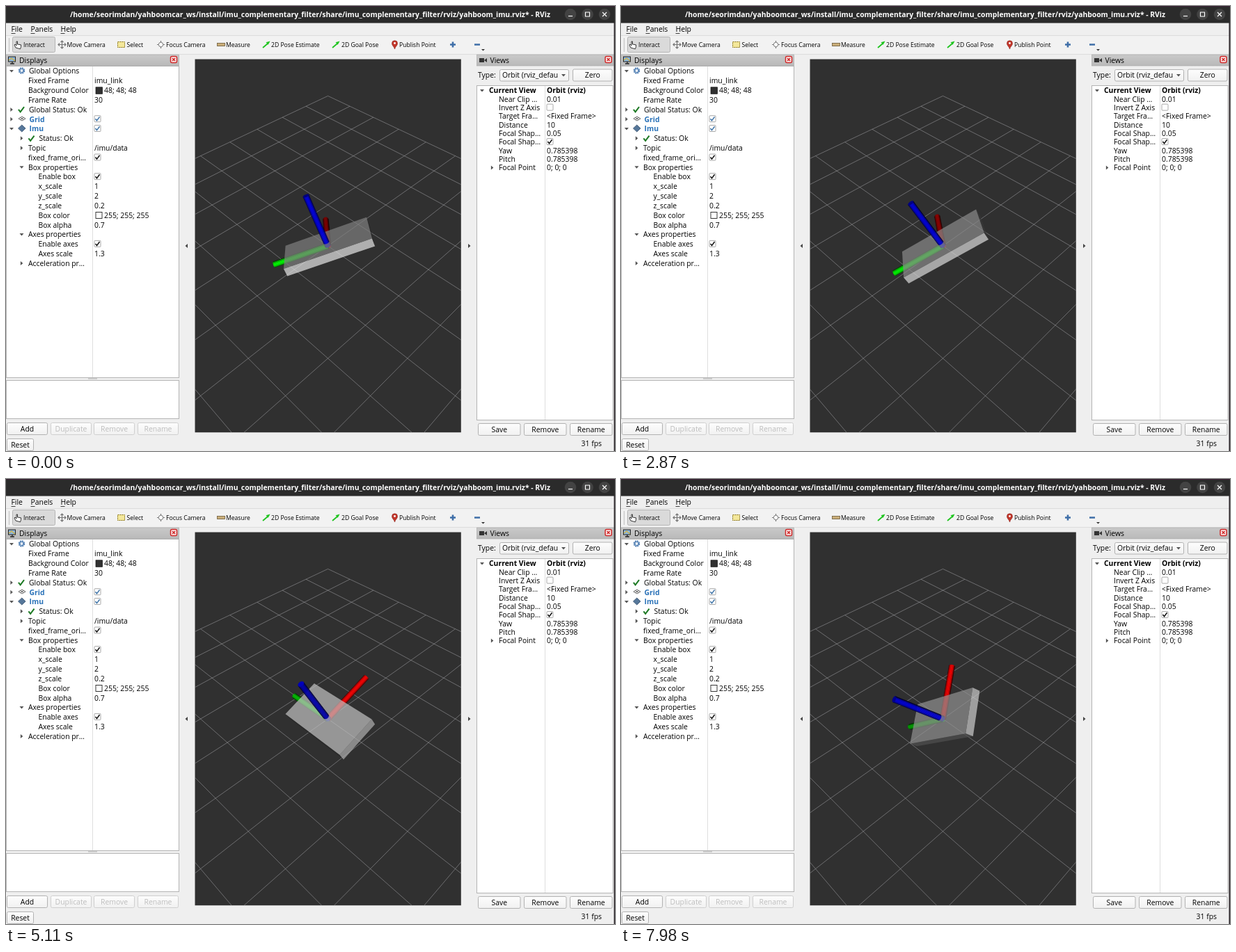
An HTML page for the animation above (8 s loop, 875 by 640 pixels).

```html
<!DOCTYPE html>
<html lang="en">
<head>
<meta charset="utf-8">
<title>Display panel</title>
<style>
html, body { margin: 0; width: 100%; height: 100%; overflow: hidden; background: #efefef; }
svg { display: block; font: 500 10.4px "Open Sans", "Noto Sans", sans-serif; }
text { white-space: pre; }
</style>
</head>
<body>
<svg id="stage" width="875" height="640" viewBox="0 0 875 640">
  <defs>
    <clipPath id="view"><rect x="271.5" y="76.5" width="382.3" height="536.8"/></clipPath>
    <clipPath id="combo"><rect x="711" y="92" width="82.5" height="16"/></clipPath>
    <linearGradient id="btn" x2="0" y2="1"><stop stop-color="#fdfdfd"/><stop offset="1" stop-color="#f1f1f1"/></linearGradient>
    <linearGradient id="head" x2="0" y2="1"><stop stop-color="#c9c9c9"/><stop offset="1" stop-color="#b9b9b9"/></linearGradient>
  </defs>
  <g id="ui"></g>
  <g clip-path="url(#view)">
    <rect x="271" y="76" width="384" height="538" fill="#303030"/>
    <path id="grid" fill="none" stroke="#a0a0a4" stroke-opacity=".6" stroke-width=".9"/>
    <g id="imu" stroke-linejoin="round"></g>
  </g>
  <text id="fps" x="856" y="632.5" text-anchor="end"></text>
</svg>
<script>
const $ = id => document.getElementById(id);
let ui = '';

// ---------- interface ----------
const rect = (x, y, w, h, fill, more = '') => ui += `<rect x="${x}" y="${y}" width="${w}" height="${h}" fill="${fill}" ${more}/>`;
const path = (d, fill, stroke = 'none', w = 1) => ui += `<path d="${d}" fill="${fill}" stroke="${stroke}" stroke-width="${w}"/>`;
const text = (x, y, s, more = '') =>
  ui += `<text x="${x}" y="${y + 3.8}" ${more}>${s.replace(/</g, '&lt;')}</text>`;
const circle = (x, y, r, fill, more = '') => ui += `<circle cx="${x}" cy="${y}" r="${r}" fill="${fill}" ${more}/>`;

function button(x, y, w, label, off) {
  rect(x + .5, y + .5, w - 1, 17, 'url(#btn)', `rx="2" stroke="${off ? '#cfcfcf' : '#b2b2b2'}"`);
  text(x + w / 2, y + 9, label, `text-anchor="middle" fill="${off ? '#bdbdbd' : '#000'}"`);
}
function tri(x, y, open) {
  path(open ? `M${x - 3} ${y - 1.5}h6l-3 3.4z` : `M${x - 1.6} ${y - 3}v6l3.4-3z`, '#555');
}
function tick(x, y, c, s = 1) {
  path(`M${x - 3 * s} ${y}l${2 * s} ${2.6 * s}l${4 * s} ${-5.4 * s}`, 'none', c, 1.5 * s);
}
function checkbox(x, y, on, c = '#111') {
  rect(x - 4.5, y - 4.5, 9, 9, '#fff', 'rx="1" stroke="#a9a9a9"');
  if (on) tick(x, y, c);
}
function header(x, w, label) {
  rect(x, 70, w, 16, 'url(#head)', 'stroke="#a5a5a5" stroke-width=".6"');
  const cx = x + w - 7.5;
  rect(cx - 4.5, 72.5, 9, 9, '#fbeeee', 'rx="2" stroke="#d02a2a" stroke-width="1.5"');
  path(`M${cx - 2} 75l4 4m0-4l-4 4`, 'none', '#d02a2a', 1.6);
  text(x + 19, 78, label);
}

// window frame and menus
rect(0, 0, 875, 24.5, '#2b2b2b');
rect(0, 0, 875, 1, '#3a2034');
text(437, 12, '/home/seorimdan/yahboomcar_ws/install/imu_complementary_filter/share/imu_complementary_filter/rviz/yahboom_imu.rviz* - RViz',
  'text-anchor="middle" fill="#fff" font-weight="700" font-size="10.37"');
[811, 835.5, 860].forEach(x => circle(x, 12, 8.3, '#434343'));
path('M808 14.5h6', 'none', '#fff', 1.2);
path('M832.5 9h6v6h-6z', 'none', '#fff', 1.2);
path('M857 9l6 6m0-6l-6 6', 'none', '#fff', 1.2);
['File', 'Panels', 'Help'].forEach((s, i) => {
  const x = [7.5, 35.5, 78.5][i];
  text(x, 33.5, s);
  path(`M${x} 39.5h6`, 'none', '#111', .8);
});

// toolbar
rect(0, 42, 875, 27, '#f2f2f2');
path('M0 42.5h875M0 69.5h875', 'none', '#dcdcdc');
path('M4.5 46v20', 'none', '#c4c4c4', 1.2);
rect(9.5, 44.5, 61, 22, '#dadada', 'rx="2" stroke="#b4b4b4"');
[[25, 'Interact'], [87.5, 'Move Camera'], [173.5, 'Select'], [230, 'Focus Camera'], [316, 'Measure'],
 [381, '2D Pose Estimate'], [482, '2D Goal Pose'], [565, 'Publish Point']]
  .forEach(([x, s]) => text(x, 55, s, 'font-size="8.6"'));
path('M14 60l-2-4 1-1 2 2v-6h1.5v4l5 .8v3l-1 3z', '#fff', '#222', .9);
path('M75 55.5h11M80.5 50v11M77 53.5l-2 2 2 2M84 53.5l2 2-2 2M78.5 52l2-2 2 2M78.5 59l2 2 2-2', 'none', '#777', 1.2);
rect(160.5, 51.5, 10, 8, '#f3e79a', 'stroke="#8a7416" stroke-dasharray="2 1"');
path('M217 55.5h11M222.5 50v11', 'none', '#777', 1.2);
circle(222.5, 55.5, 3.2, '#fff', 'stroke="#777"');
rect(303.5, 53.5, 11, 4, '#c9ad78', 'stroke="#6d5b3a" stroke-width=".8"');
[369, 469].forEach(x => {
  path(`M${x} 60l7-6`, 'none', '#1fc41f', 1.8);
  path(`M${x + 10.5} 50.5l-6 1.8 3.2 3.4z`, '#1fc41f');
});
path('M558.5 62c-1-4-4-5-4-8.3a4 4 0 0 1 8 0c0 3.3-3 4.3-4 8.3z', '#c2362b', '#8b241c', .6);
circle(558.5, 53.5, 1.4, '#fff');
path('M638 55.5h8M642 51.5v8M673 55.5h8', 'none', '#3f6fa8', 2.6);
path('M683 62h5l-2.5 2.6z', '#333');

// displays panel
header(0, 248.5, 'Displays');
rect(3.5, 73, 10, 7, '#8fb8dc', 'stroke="#222"');
path('M6 83h6M9 80v3', 'none', '#222', 1.3);
path('M4 78l4-3 5 4', 'none', '#d8b23a', 1.2);
rect(.5, 86.5, 248, 448, '#fff', 'stroke="#b4b4b4"');
path('M124.5 87v447', 'none', '#dedede');
const row = i => 93.6 + 13.82 * i;
[[33, 'Global Options'], [32, 'Fixed Frame', 'imu_link'], [32, 'Background Color', '48; 48; 48', 141],
 [32, 'Frame Rate', '30'], [33, 'Global Status: Ok'], [33.5, 'Grid'], [33.5, 'Imu'], [47.5, 'Status: Ok'],
 [32, 'Topic', '/imu/data'], [32, 'fixed_frame_ori…'], [32, 'Box properties'], [46.5, 'Enable box'],
 [46.5, 'x_scale', '1'], [46.5, 'y_scale', '2'], [46.5, 'z_scale', '0.2'], [46.5, 'Box color', '255; 255; 255', 141],
 [46.5, 'Box alpha', '0.7'], [32, 'Axes properties'], [46.5, 'Enable axes'], [46.5, 'Axes scale', '1.3'],
 [32, 'Acceleration pr…']].forEach(([x, name, val, vx = 127], i) => {
  text(x, row(i), name, i === 5 || i === 6 ? 'fill="#2a72b8" font-weight="700"' : '');
  if (val) text(vx, row(i), val);
});
[[8, 0, 1], [8, 4], [8, 5], [8, 6, 1], [22.5, 7], [22.5, 8], [22.5, 10, 1], [22.5, 17, 1], [22.5, 20]]
  .forEach(([x, i, open]) => tri(x, row(i), open));
[[5, '#3f74a8'], [6, '#3f74a8'], [9], [11], [18]].forEach(([i, c]) => checkbox(131.5, row(i) - .5, true, c));
circle(22.5, 93, 3.6, 'none', 'stroke="#4a7ab0" stroke-width="2.2" stroke-dasharray="2 .8"');
circle(22.5, 93, 2.4, 'none', 'stroke="#4a7ab0"');
tick(22, row(4), '#1d7a24', 1.35);
tick(36.5, row(7), '#1d7a24', 1.35);
path('M18 162l5-3 5 3-5 3zM20.5 160.5l5 3M25.5 160.5l-5 3', 'none', '#555', .9);
path('M17.5 176l5.3-5 5.3 5-5.3 5z', '#56779a', '#35506c', .8);
rect(129, 116.8, 9.5, 9.5, '#303030', 'stroke="#111" stroke-width=".7"');
rect(129, 296.5, 9, 9, '#fff', 'stroke="#222" stroke-width=".9"');
path('M118 536h13', 'none', '#aaa');
rect(.5, 538.5, 248, 55, '#fff', 'stroke="#b4b4b4"');
button(1, 599, 59, 'Add');
button(64, 599, 59, 'Duplicate', true);
button(126, 599, 59, 'Remove', true);
button(189, 599, 59, 'Rename', true);
button(1, 622, 39, 'Reset');

// views panel
header(676.5, 196.5, 'Views');
path('M680 75h7v6h-7zM687 78l4-3v6z', '#333');
text(678, 99.5, 'Type:');
rect(709.5, 91.5, 99, 16.5, 'url(#btn)', 'rx="2" stroke="#b2b2b2"');
text(713, 99.5, 'Orbit (rviz_default)', 'clip-path="url(#combo)"');
path('M798 98h6l-3 3.5z', '#555');
button(814, 90.5, 57.5, 'Zero');
rect(676.5, 114.5, 195.5, 481, '#fff', 'stroke="#b4b4b4"');
path('M774.5 115v480', 'none', '#dedede');
[['Current View', 'Orbit (rviz)'], ['Near Clip …', '0.01'], ['Invert Z Axis'], ['Target Fra…', '<Fixed Frame>'],
 ['Distance', '10'], ['Focal Shap…', '0.05'], ['Focal Shap…'], ['Yaw', '0.785398'], ['Pitch', '0.785398'],
 ['Focal Point', '0; 0; 0']].forEach(([name, val], i) => {
  const y = 121.4 + 12.36 * i, style = i ? '' : 'font-weight="700"';
  text(i ? 708 : 694, y, name, style);
  if (val) text(777, y, val, style);
  else checkbox(781.5, y - .5, i === 6);
});
tri(684, 121.5, 1);
tri(698.5, 232.5);
button(678, 600, 61.5, 'Save');
button(744, 600, 61.5, 'Remove');
button(810, 600, 61.5, 'Rename');
path('M261 342v6l-3.5-3zM664 342v6l3.5-3z', '#444');
rect(873.5, 24, 1.5, 616, '#2a2428');
$('ui').innerHTML = ui;

// ---------- 3D scene, in camera space: right, up, towards the viewer ----------
const DIST = 10, FOCAL = 647, CX = 462.5, CY = 345;
const dot = (a, b) => a[0] * b[0] + a[1] * b[1] + a[2] * b[2];
const cross = (a, b) => [a[1] * b[2] - a[2] * b[1], a[2] * b[0] - a[0] * b[2], a[0] * b[1] - a[1] * b[0]];
const mix = (...terms) => [0, 1, 2].map(i => terms.reduce((s, [k, v]) => s + k * v[i], 0));
const unit = v => mix([1 / Math.hypot(...v), v]);
const project = p => {
  const s = FOCAL / (DIST - p[2]);
  return `${(CX + p[0] * s).toFixed(2)} ${(CY - p[1] * s).toFixed(2)}`;
};
const faces = (n, p) => dot(n, [-p[0], -p[1], DIST - p[2]]) > 0;

// ground point seen by a camera at yaw 45°, pitch 45°
const ground = (x, y) => [(y - x) * Math.SQRT1_2, -(x + y) / 2, (x + y) / 2];
let lines = '';
for (let i = -5; i <= 5; i++)
  lines += `M${project(ground(i, -5))}L${project(ground(i, 5))}M${project(ground(-5, i))}L${project(ground(5, i))}`;
$('grid').setAttribute('d', lines);

const shade = (rgb, light) => `rgb(${rgb.map(c => Math.round(c * Math.max(0, Math.min(1, light))))})`;
const poly = (pts, color, more) => `<polygon points="${pts.map(project).join(' ')}" fill="${color}" ${more || `stroke="${color}" stroke-width=".35"`}/>`;

function cylinder(u, v, w, from, to, rgb) {
  const N = 20, R = .065;
  const normal = k => { const a = k * 2 * Math.PI / N; return mix([Math.cos(a), v], [Math.sin(a), w]); };
  const ring = (k, at) => mix([R, normal(k)], [at, u]);
  let out = '';
  for (let k = 0; k < N; k++) {
    const n = normal(k + .5);
    if (faces(n, mix([R, n], [to, u])))
      out += poly([ring(k, from), ring(k + 1, from), ring(k + 1, to), ring(k, to)], shade(rgb, n[2]));
  }
  const cap = at => Array.from({ length: N }, (_, k) => ring(k, at));
  if (faces(u, mix([to, u]))) out += poly(cap(to), shade(rgb, u[2]));
  if (!from && u[2] < 0) out += poly(cap(0), shade(rgb, -u[2]));
  return out;
}

const HALF = [.5, 1, .1], LENGTH = 1.3;
const COLORS = [[255, 0, 0], [0, 255, 0], [0, 0, 255]];

function box(axes) {
  let out = '';
  axes.forEach((a, i) => [1, -1].forEach(s => {
    const n = mix([s, a]), c = mix([HALF[i], n]);
    if (!faces(n, c)) return;
    const j = (i + 1) % 3, k = (i + 2) % 3;
    const pts = [[1, 1], [1, -1], [-1, -1], [-1, 1]]
      .map(([p, q]) => mix([1, c], [p * HALF[j], axes[j]], [q * HALF[k], axes[k]]));
    out += poly(pts, shade([255, 255, 255], n[2] * 1.04), 'fill-opacity=".7"');
  }));
  return out;
}

// time, z axis, y axis
const POSES = [
  [0, -.352, .803, .48, -.91, -.333, -.149],
  [1260, -.237, .95, -.165, -.945, -.258, -.07],
  [2380, -.25, .9, .325, -.945, -.297, .056],
  [3500, -.79, .18, .58, -.58, -.53, -.62],
  [4050, -.88, .05, .47, -.46, .11, -.87],
  [5110, -.41, .53, .72, -.63, .44, -.65],
  [6160, -.28, .92, .27, -.874, -.128, -.468],
  [7000, -.82, .14, .55, -.47, -.57, -.6],
  [7450, -.91, -.02, .4, -.4, -.1, -.9],
  [7980, -.77, .31, .55, -.635, -.138, -.76]
];

function pose(t) {
  let i = 0;
  while (i < POSES.length - 2 && t >= POSES[i + 1][0]) i++;
  const a = POSES[i], b = POSES[i + 1], before = POSES[i - 1] || a, after = POSES[i + 2] || b;
  const span = b[0] - a[0], u = (t - a[0]) / span, v = 1 - u;
  const at = k => {
    const ma = (b[k] - before[k]) / (b[0] - before[0]) * span;
    const mb = (after[k] - a[k]) / (after[0] - a[0]) * span;
    return v * v * (1 + 2 * u) * a[k] + u * u * (1 + 2 * v) * b[k] + u * v * (v * ma - u * mb);
  };
  const z = unit([at(1), at(2), at(3)]), y0 = [at(4), at(5), at(6)];
  const y = unit(mix([1, y0], [-dot(y0, z), z]));
  return [cross(y, z), y, z];
}

const RATES = [[0, 31], [140, 30], [700, 31], [1190, 24], [1750, 30], [2310, 31], [4410, 30], [4970, 31], [5530, 30], [6090, 31]];
const STEP = 70, LOOP = 8000, HOLDS = [490, 4200, 5320, 7910];
let shown = -1;

function draw(time) {
  let t = Math.floor(time % LOOP / STEP) * STEP;
  if (HOLDS.includes(t)) t -= STEP;
  if (t === shown) return;
  shown = t;
  const axes = pose(t);
  let back = '', front = '';
  [0, 1, 2].sort((a, b) => axes[a][2] - axes[b][2]).forEach(i => {
    const u = axes[i], v = axes[(i + 1) % 3], w = axes[(i + 2) % 3];
    if (faces(u, mix([HALF[i], u]))) {
      back += cylinder(u, v, w, 0, HALF[i], COLORS[i]);
      front += cylinder(u, v, w, HALF[i], LENGTH, COLORS[i]);
    } else back += cylinder(u, v, w, 0, LENGTH, COLORS[i]);
  });
  $('imu').innerHTML = back + box(axes) + front;
  $('fps').textContent = RATES.filter(r => r[0] <= t).pop()[1] + ' fps';
}

let start;
function tickFrame(now) {
  start ??= now;
  draw(now - start);
  requestAnimationFrame(tickFrame);
}
draw(0);
requestAnimationFrame(tickFrame);
</script>
</body>
</html>
```
